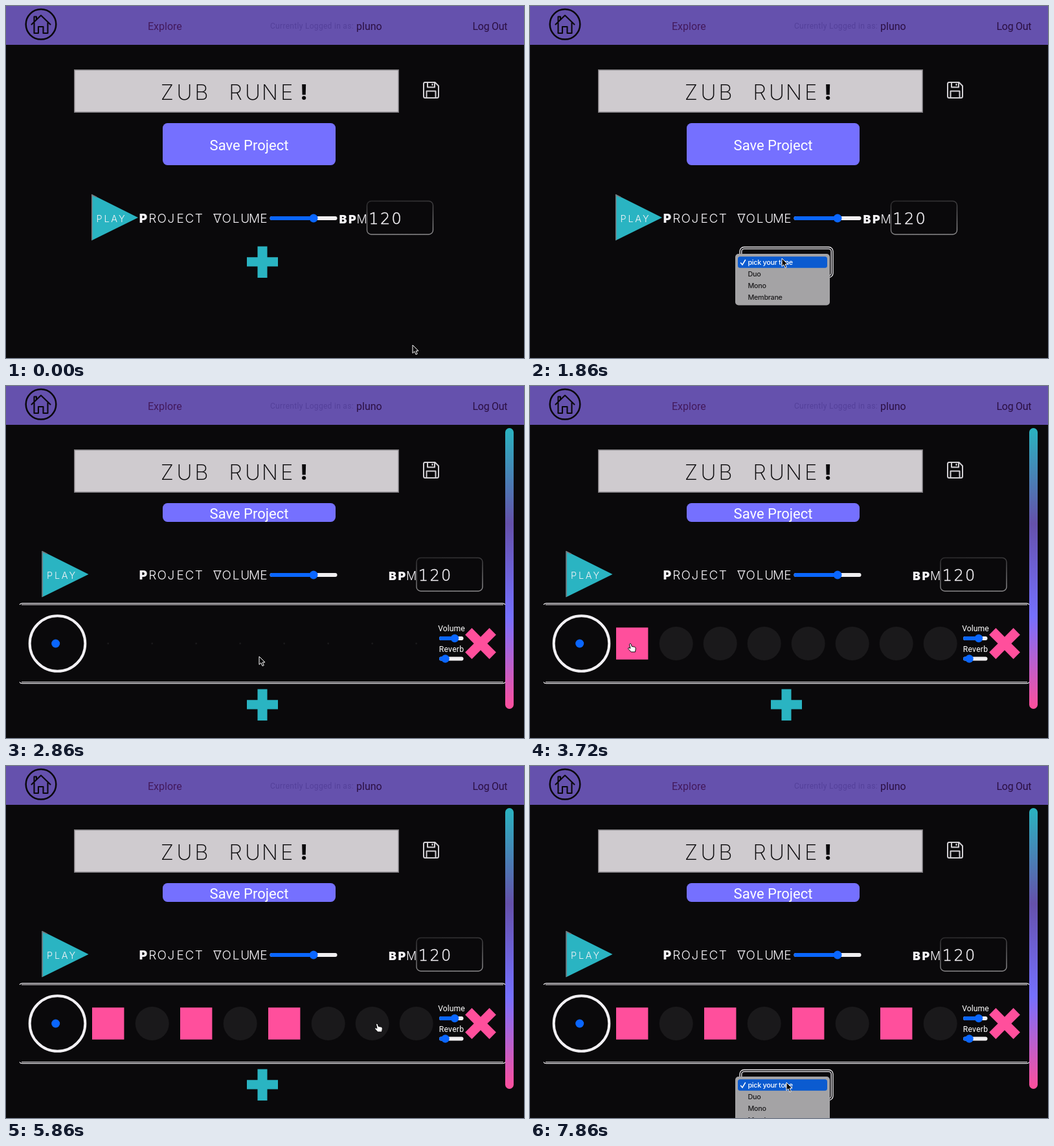
These frames come from a looping animation (800 by 544 pixels, 8000 ms). An HTML page:

```html
<!DOCTYPE html>
<html lang="en">
<head>
<meta charset="utf-8">
<title>Step sequencer</title>
<style>
  html, body { margin: 0; width: 100%; height: 100%; overflow: hidden; background: #0a090b; }
  svg { display: block; width: 800px; height: 544px; }
  text { font-family: Roboto, "Open Sans", sans-serif; white-space: pre; }
  .cells { font-family: Inter, "Open Sans", sans-serif; font-weight: 300; text-anchor: middle; fill: #f6f4f8; }
  .cells tspan { font-weight: 900; }
  .digits { font-family: "DejaVu Sans", sans-serif; font-weight: 200; stroke: #f6f4f8; stroke-width: .5px; }
  .title { font-weight: 200; fill: #0a090b; }
  .title tspan { font-weight: 800; }
  .nav { font-size: 16px; fill: #2b0f42; }
  .mid { text-anchor: middle; fill: #fff; }
  .menu text { font: 500 10.8px Inter, "Open Sans", sans-serif; letter-spacing: -.3px; fill: #1c1b1d; }
  .menu text.on { fill: #fff; }
  .teal { fill: #2ab4c2; }
  .pink { fill: #ff4f9c; }
  .line { fill: none; stroke: #f0eef2; }
</style>
</head>
<body>
<svg viewBox="0 0 800 544">
  <defs>
    <linearGradient id="bar" x2="0" y2="1">
      <stop stop-color="#2ab4c0"/>
      <stop offset=".34" stop-color="#6551ab"/>
      <stop offset=".67" stop-color="#7570ff"/>
      <stop offset="1" stop-color="#ff4f9c"/>
    </linearGradient>
    <linearGradient id="inset" x2=".15" y2="1">
      <stop stop-color="#2c2b2d"/>
      <stop offset="1" stop-color="#8a898b"/>
    </linearGradient>
  </defs>
  <rect width="800" height="544" fill="#0a090b"/>

  <rect width="800" height="60" fill="#6551ad"/>
  <g fill="none" stroke="#0a080c" stroke-width="2.1">
    <circle cx="54" cy="28.3" r="23.3" stroke-width="2.5"/>
    <path d="M39.5 28.5 54 14.5 68.5 28.5M43.5 26V42H50V32H57.5V42H64.5V26M43.5 24V16.5H47V20.5" stroke-linejoin="round" stroke-linecap="round"/>
  </g>
  <text class="nav" x="219" y="36.5" style="fill:#43195c">Explore</text>
  <text x="408" y="35" font-size="12" letter-spacing=".3" fill="#54409a">Currently Logged in as:</text>
  <text class="nav" x="541" y="36.5">pluno</text>
  <text class="nav" x="720.5" y="36.5" letter-spacing="-.3">Log Out</text>

  <rect x="105" y="98" width="502" height="67" fill="#cfcbcf"/>
  <path d="M105.700 165V98.700H607" fill="none" stroke="#7f7c80" stroke-width="1.400"/>
  <path d="M105 164.300H606.300V98" fill="none" stroke="#747176" stroke-width="1.400"/>
  <text class="cells title" data-x="249" data-step="26.4" y="145" font-size="33">ZUB RUNE<tspan>!</tspan></text>
  <g fill="none" stroke="#d2d0d4" stroke-width="2" stroke-linejoin="round">
    <path d="M647 118H662.500L668 123.500V139.500Q668 142 665.500 142H647.500Q645 142 645 139.500V120.500Q645 118 647 118Z"/>
    <path d="M651 118V125.500H662V118M658.500 120V123M649.500 142V131.500H663.500V142"/>
  </g>

  <rect id="save" x="242" y="181" width="267" rx="7.5" fill="#7570ff"/>
  <text id="saveText" class="mid" x="375.5" font-size="22">Save Project</text>

  <g id="play">
    <path class="teal" d="M132 291 204 327 132 362.500Z"/>
    <path d="M132.700 291.500V362M132 291.500 140 295.500" stroke="#77767a" stroke-width="1.500"/>
    <text class="cells" data-x="144" data-step="11.6" y="334" font-size="14.500">PLAY</text>
  </g>
  <g id="vol">
    <text class="cells" data-x="212" data-step="14.3" y="335" font-size="19"><tspan>P</tspan>ROJECT VOLUME</text>
    <path class="line" d="M320.500 321.700H332.500" stroke-width="1.300"/>
    <rect x="407.500" y="325" width="104" height="6" rx="3" fill="#f0eef0"/>
    <rect x="407.500" y="325" width="67" height="6" rx="3" fill="#0a66ff"/>
    <circle cx="475" cy="328" r="6.500" fill="#0a66ff"/>
  </g>
  <g id="bpm">
    <text class="cells" data-x="520.5" data-step="14.5" y="336" font-size="18"><tspan>BP</tspan>M</text>
    <rect x="557.500" y="301.500" width="102" height="51.500" rx="6.500" fill="none" stroke="url(#inset)" stroke-width="1.400"/>
    <text class="cells digits" data-x="568" data-step="17.6" y="337" font-size="24">120</text>
  </g>

  <g id="track">
    <path class="line" stroke-width="1.200" d="M21 338Q22 335.800 25 335.800H767Q770 335.800 771 338M24 338H768M21 457.500Q22 459.700 25 459.700H767Q770 459.700 771 457.500M24 457.500H768"/>
    <circle cx="79.500" cy="398" r="42.800" fill="none" stroke="#f2f0f4" stroke-width="4"/>
    <circle cx="76.700" cy="398" r="6.500" fill="#0a66ff"/>
    <g id="steps"></g>
    <text class="mid" x="688" y="379.300" font-size="12.200">Volume</text>
    <text class="mid" x="688" y="410.800" font-size="12.200" letter-spacing=".2">Reverb</text>
    <g fill="#0a66ff">
      <rect x="669" y="387" width="37.500" height="6" rx="3" fill="#f0eef0"/>
      <rect x="669" y="387" width="24" height="6" rx="3"/>
      <circle cx="693" cy="390" r="6.200"/>
      <rect x="669" y="418.500" width="37.500" height="6" rx="3" fill="#f0eef0"/>
      <rect x="669" y="418.500" width="10" height="6" rx="3"/>
      <circle cx="678.500" cy="421.500" r="6.200"/>
    </g>
    <path class="pink" d="M-7.300-26.500H7.300V-7.300H26.500V7.300H7.300V26.500H-7.300V7.300H-26.500V-7.300H-7.300Z" transform="translate(733 398) rotate(45)"/>
    <rect x="771" y="65" width="13" height="434" rx="6.500" fill="url(#bar)"/>
  </g>

  <g id="adder">
    <path id="plus" class="teal" d="M388.500 371.500H403.500V388.200H420V402.600H403.500V420H388.500V402.600H372V388.200H388.500Z"/>
    <g id="menu" class="menu">
      <rect class="line" x="324" y="372.500" width="144" height="47" rx="6.500" stroke-width="1.300"/>
      <rect class="line" x="326.800" y="375.300" width="138.400" height="41.400" rx="4" stroke-width="1.300"/>
      <rect x="317" y="383" width="146" height="79.500" rx="5" fill="#a4a3a5"/>
      <rect id="glow" x="321" width="138" height="17.500" rx="3.500" fill="#0b5bd0"/>
      <path id="check" d="M325.500 397 328 400 332.500 392.500" fill="none" stroke-width="1.500" stroke-linecap="round"/>
      <text x="336.500" y="400">pick your tone</text>
      <text x="336.500" y="418">Duo</text>
      <text x="336.500" y="436">Mono</text>
      <text x="336.500" y="453.700">Membrane</text>
    </g>
  </g>

  <g id="cursor" stroke-linejoin="round">
    <path id="arrow" d="M0 0V12.500L2.900 9.800 5 14.600 7.200 13.700 5.200 9H9Z" fill="#0a090b" stroke="#fff"/>
    <path id="hand" d="M-1.500 1Q0-1 1.200 1L2.200 4.500 6.500 5.200Q8.500 5.800 8.300 8L7.500 13H1.200L-3 8.500Q-4 6.500-2 6.500L0 7.500Z" fill="#fff" stroke="#0a090b"/>
  </g>
</svg>
<script>
const $ = id => document.getElementById(id);
const LOOP = 8000, RATE = 7;
const OPEN = 10, ADDED = 19, GROWN = 25, REOPEN = 51;
const clicks = { 0: 26, 2: 33, 4: 37, 6: 43 };
const path = [
  [1, 628, 524], [9, 389, 390], [14, 389, 390], [17, 391, 418], [20, 391, 418],
  [25, 155, 398], [28, 155, 398], [32, 291, 398], [33, 291, 398], [36, 427, 398],
  [37, 427, 398], [41, 573, 398], [43, 573, 398], [48, 396.5, 492], [50, 396.5, 492], [51, 396, 489]
];
const stepX = i => 157.7 + 68 * i;

// one x per character keeps the wide monospaced rhythm
for (const el of document.querySelectorAll('.cells')) {
  const { x, step } = el.dataset;
  el.setAttribute('x', [...el.textContent].map((c, i) => +x + i * step).join(' '));
}

const make = (tag, attrs) => {
  const el = document.createElementNS('http://www.w3.org/2000/svg', tag);
  for (const k in attrs) el.setAttribute(k, attrs[k]);
  return $('steps').appendChild(el);
};
const steps = Array.from({ length: 8 }, (_, i) => ({
  off: make('circle', { cx: stepX(i), cy: 398, fill: '#1a191b' }),
  on: make('rect', { x: stepX(i) - 24.7, y: 373.3, width: 49.4, height: 49.4, class: 'pink' })
}));
const items = [...document.querySelectorAll('.menu text')];

const show = (el, on) => el.style.display = on ? '' : 'none';
const shift = (el, x, y) => el.setAttribute('transform', `translate(${x} ${y})`);

function cursorAt(tick) {
  const n = path.findIndex(p => p[0] > tick);
  if (n === 0) return path[0].slice(1);
  if (n < 0) return path[path.length - 1].slice(1);
  const [t0, x0, y0] = path[n - 1], [t1, x1, y1] = path[n];
  const u = (tick - t0) / (t1 - t0), k = u * u * (3 - 2 * u);
  return [x0 + (x1 - x0) * k, y0 + (y1 - y0) * k];
}

function draw(tick) {
  const added = tick >= ADDED;
  const dx = added ? 76.5 : 0, dy = added ? -36 : 0;
  const [x, y] = cursorAt(tick);

  $('save').setAttribute('height', added ? 29 : 65);
  $('saveText').setAttribute('y', added ? 204.5 : 222.7);
  shift($('play'), -dx, dy);
  shift($('vol'), 0, dy);
  shift($('bpm'), dx, dy);
  show($('track'), added);

  const grow = Math.min(1, Math.max(0, (tick - ADDED) / (GROWN - ADDED)));
  steps.forEach(({ off, on }, i) => {
    const lit = tick >= clicks[i];
    off.setAttribute('r', 26 * grow ** 1.6);
    show(off, !lit);
    show(on, lit);
  });

  const open = added ? tick >= REOPEN : tick >= OPEN;
  const shiftY = added ? 97 : 0;
  shift($('adder'), 0, shiftY);
  show($('plus'), !open);
  show($('menu'), open);
  const row = y - shiftY > 405 ? 1 : 0;
  $('glow').setAttribute('y', 387.2 + row * 17.9);
  $('check').setAttribute('stroke', row ? '#1c1b1d' : '#fff');
  items.forEach((el, i) => el.classList.toggle('on', i === row));

  const near = steps.some((s, i) => Math.hypot(x - stepX(i), y - 398) < 26);
  const hand = tick > 21 && near;
  shift($('cursor'), x, y);
  show($('hand'), hand);
  show($('arrow'), !hand);
}

// the small lead absorbs delays rounded to 10 ms
const tickAt = ms => Math.floor(ms % LOOP * RATE / 1000 + .04);

function frame(now) {
  draw(tickAt(now));
  requestAnimationFrame(frame);
}
draw(0);
requestAnimationFrame(frame);
</script>
</body>
</html>
```
